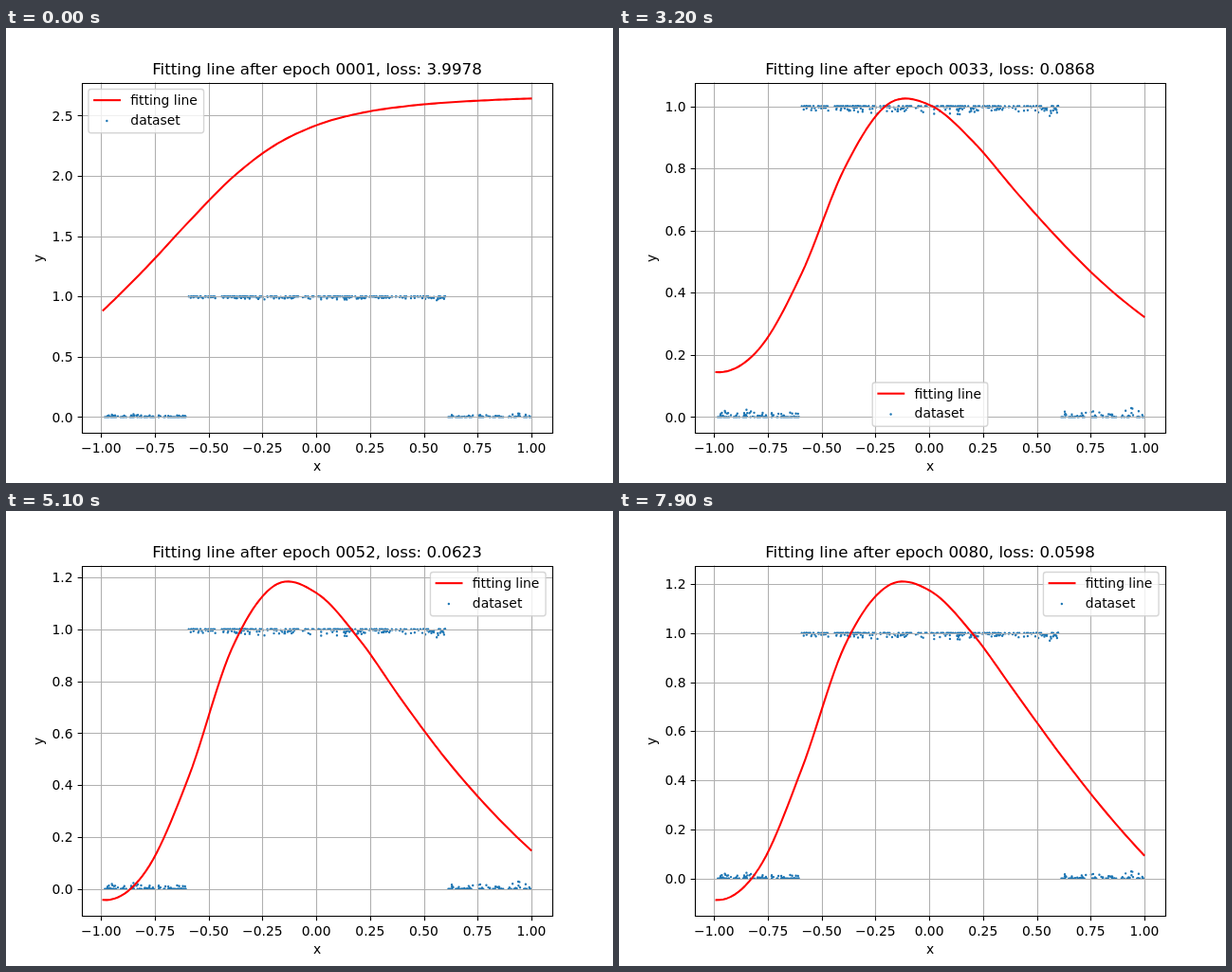
An HTML page that plays this animation: 640 px wide and 480 px high, repeating every 8 s.

```html
<!DOCTYPE html>
<html lang="en">
<head>
<meta charset="utf-8">
<title>Fitting line</title>
<style>
  html, body { margin: 0; width: 100%; height: 100%; overflow: hidden; background: #fff; }
  svg { display: block; width: 640px; height: 480px; font: 13.89px "DejaVu Sans", sans-serif; }
  .title { font-size: 16.67px; }
  .mid { text-anchor: middle; }
  .end { text-anchor: end; }
  path { fill: none; }
  .dots { stroke: #1f77b4; stroke-width: 2.4; stroke-linecap: round; }
  .grid { stroke: #b0b0b0; stroke-width: 1.11; }
  .axis { stroke: #000; stroke-width: 1.11; }
  .fit { stroke: #f00; stroke-width: 2.08; stroke-linecap: square; stroke-linejoin: round; }
  .box { fill: #fff; fill-opacity: .8; stroke: #ccc; stroke-opacity: .8; stroke-width: 1.39; }
</style>
</head>
<body>
<svg id="plot" viewBox="0 0 640 480"></svg>
<script>
const LEFT = 80, RIGHT = 576, TOP = 57.6, BOTTOM = 427.2;
const X0 = -0.99, X1 = 0.998, EPOCHS = 80, STEP_MS = 100;
const SAMPLES = 120, DECAY = 0.53;
const LEGEND_W = 121.6, LEGEND_H = 46.2, INSET = 6.94;

// Line heights at 11 even steps of x for a few epochs, with the loss
const keys = [
  [1, 3.9978, [.885, 1.238, 1.62, 1.98, 2.252, 2.422, 2.52, 2.575, 2.608, 2.628, 2.642]],
  [8, .1913, [.469, .4535, .487, .578, .684, .751, .7665, .747, .711, .675, .643]],
  [23, .1236, [.293, .338, .493, .712, .853, .882, .828, .735, .638, .549, .467]],
  [40, .0693, [.052, .143, .442, .855, 1.096, 1.077, .924, .722, .534, .368, .235]],
  [52, .0623, [-.042, .07, .433, .923, 1.168, 1.138, .958, .723, .503, .313, .15]],
  [60, .0611, [-.068, .053, .437, .936, 1.183, 1.155, .974, .736, .503, .298, .125]],
  [80, .0598, [-.088, .042, .447, .947, 1.191, 1.172, .996, .756, .516, .293, .095]]
];
const knots = keys[0][2].map((_, i) => X0 + (X1 - X0) * i / 10);

// Cubic Hermite curve with parabolic slopes
function curve(xs, ys, x) {
  const last = xs.length - 1;
  const secant = i => (ys[i + 1] - ys[i]) / (xs[i + 1] - xs[i]);
  const slope = i => {
    if (i === 0) return 2 * secant(0) - slope(1);
    if (i === last) return 2 * secant(last - 1) - slope(last - 1);
    const a = xs[i] - xs[i - 1], b = xs[i + 1] - xs[i];
    return (secant(i - 1) * b + secant(i) * a) / (a + b);
  };
  let i = 0;
  while (i < last - 1 && x > xs[i + 1]) i++;
  const h = xs[i + 1] - xs[i], t = (x - xs[i]) / h, u = 1 - t;
  return ys[i] * u * u * (1 + 2 * t) + ys[i + 1] * t * t * (3 - 2 * t)
    + h * t * u * (slope(i) * u - slope(i + 1) * t);
}

// Fast decay at first, smooth training afterwards
function atEpoch(n, pick) {
  const [first, second] = keys;
  if (n < second[0]) {
    const end = DECAY ** (second[0] - 1);
    const w = (DECAY ** (n - 1) - end) / (1 - end);
    return pick(second) + (pick(first) - pick(second)) * w;
  }
  const later = keys.slice(1);
  return curve(later.map(k => k[0]), later.map(pick), n);
}

let seed = 20;
function random() {
  seed = (seed * 1664525 + 1013904223) % 4294967296;
  return (seed + 0.5) / 4294967296;
}
const normal = () => Math.sqrt(-2 * Math.log(random())) * Math.cos(2 * Math.PI * random());

function cluster(count, from, to, level) {
  return Array.from({ length: count }, () => [
    from + (to - from) * random(),
    Math.min(1, Math.max(0, level + 0.011 * normal()))
  ]);
}
const dots = [
  ...cluster(110, X0, -0.6, 0),
  ...cluster(290, -0.595, 0.6, 1),
  ...cluster(85, 0.605, X1, 0)
];

const snap = v => Math.floor(v + 0.5) + 0.5;
const scale = (lo, hi, a, b) => v => a + (b - a) * (v - lo) / (hi - lo);
const label = (v, digits) => v.toFixed(digits).replace("-", "\u2212");
const text = (x, y, s, cls = "") => `<text x="${x}" y="${y}" class="${cls}">${s}</text>`;
const path = (cls, d) => `<path class="${cls}" d="${d}"/>`;
const point = p => p[0].toFixed(2) + " " + p[1].toFixed(2);

function ticks(lo, hi) {
  const step = [0.1, 0.2, 0.25, 0.5, 1].find(s => s >= (hi - lo) / 9);
  const values = [];
  for (let i = Math.ceil(lo / step); i * step <= hi; i++) values.push(i * step);
  return { values, digits: step === 0.25 ? 2 : 1 };
}

// First corner or side that hides the fewest points
function legendPlace(points) {
  const l = LEFT + INSET, r = RIGHT - INSET - LEGEND_W, c = (LEFT + RIGHT - LEGEND_W) / 2;
  const t = TOP + INSET, b = BOTTOM - INSET - LEGEND_H, m = (TOP + BOTTOM - LEGEND_H) / 2;
  const places = [[r, t], [l, t], [l, b], [r, b], [r, m], [l, m], [c, b], [c, t], [c, m]];
  const hidden = ([x, y]) => points.filter(p =>
    p[0] > x && p[0] < x + LEGEND_W && p[1] > y && p[1] < y + LEGEND_H).length;
  const counts = places.map(hidden);
  return places[counts.indexOf(Math.min(...counts))];
}

function legend([x, y]) {
  const lineY = y + 11.6;
  return `<rect class="box" x="${x}" y="${y}" width="${LEGEND_W}" height="${LEGEND_H}" rx="2.78"/>`
    + path("fit", `M${x + 6.2} ${lineY}h26.8`)
    + path("dots", `M${x + 19.4} ${y + 33.5}h0`)
    + text(x + 44.4, y + 16.5, "fitting line")
    + text(x + 44.4, y + 37, "dataset");
}

function draw(n) {
  const heights = knots.map((_, i) => atEpoch(n, k => k[2][i]));
  const loss = atEpoch(n, k => k[1]);
  const line = Array.from({ length: SAMPLES + 1 }, (_, i) => {
    const x = X0 + (X1 - X0) * i / SAMPLES;
    return [x, curve(knots, heights, x)];
  });
  const ys = line.map(p => p[1]);
  const min = Math.min(0, ...ys), max = Math.max(1, ...ys);
  const pad = 0.05 * (max - min);
  const padX = 0.05 * (X1 - X0);
  const px = scale(X0 - padX, X1 + padX, LEFT, RIGHT);
  const py = scale(min - pad, max + pad, BOTTOM, TOP);
  const toStage = p => [px(p[0]), py(p[1])];
  const linePts = line.map(toStage), dotPts = dots.map(toStage);
  const xt = ticks(X0 - padX, X1 + padX), yt = ticks(min - pad, max + pad);

  let grid = "", marks = "", labels = "";
  for (const v of xt.values) {
    const x = snap(px(v));
    grid += `M${x} ${TOP}V${BOTTOM}`;
    marks += `M${x} 427.5v4.86`;
    labels += text(px(v).toFixed(2), 448, label(v, xt.digits), "mid");
  }
  for (const v of yt.values) {
    const y = snap(py(v));
    grid += `M${LEFT} ${y}H${RIGHT}`;
    marks += `M80.5 ${y}h-4.86`;
    labels += text(70.6, Math.round(py(v) + 5.2), label(v, yt.digits), "end");
  }
  const labelX = yt.digits === 2 ? 30.2 : 39;
  const title = `Fitting line after epoch ${String(n).padStart(4, "0")}, loss: ${loss.toFixed(4)}`;

  plot.innerHTML = path("dots", dotPts.map(p => `M${point(p)}h0`).join(""))
    + path("grid", grid)
    + path("fit", "M" + linePts.map(point).join("L"))
    + path("axis", marks + "M80.5 58.5H576.5V427.5H80.5Z")
    + labels
    + text(328, 467, "x", "mid")
    + `<text class="mid" transform="translate(${labelX} 243) rotate(-90)">y</text>`
    + text(328, 49, title, "mid title")
    + legend(legendPlace([...linePts, ...dotPts]));
}

const plot = document.getElementById("plot");
const start = performance.now();
let shown = 0;
function tick() {
  const elapsed = Math.max(0, performance.now() - start);
  const n = Math.floor(elapsed / STEP_MS) % EPOCHS + 1;
  if (n !== shown) draw(shown = n);
  requestAnimationFrame(tick);
}
tick();
</script>
</body>
</html>
```
